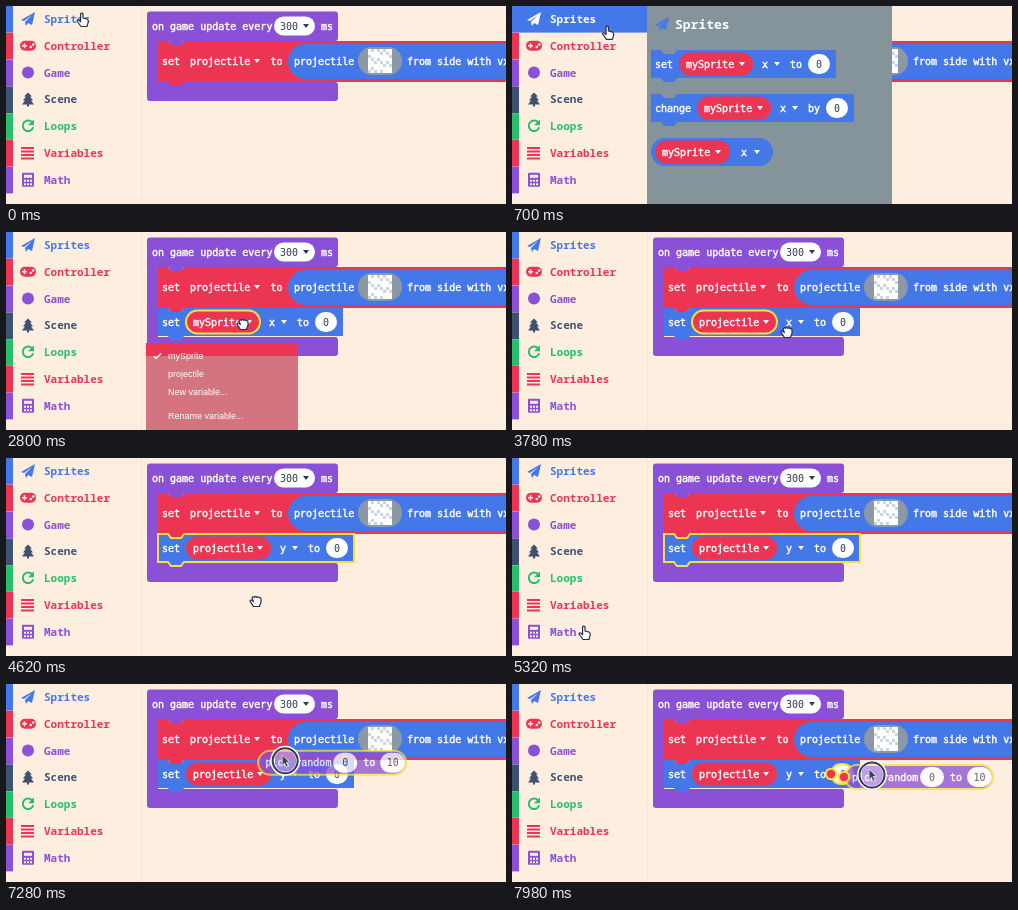
An HTML page that plays this animation: 500 by 198 pixels, repeating every 8 s.

```html
<!DOCTYPE html>
<html lang="en">
<head>
<meta charset="utf-8">
<title>Block editor</title>
<style>
  html, body { margin: 0; width: 100%; height: 100%; overflow: hidden; background: #feeedf; }
  svg { display: block; width: 500px; height: 198px; }
  text { white-space: pre; stroke-width: 0; }
  .code { font: 10px "DejaVu Sans Mono", monospace; stroke-width: .45px; }
  .num { font: 10px "DejaVu Sans Mono", monospace; }
  .side { font: 600 11px "Noto Sans Mono", "DejaVu Sans Mono", monospace; }
  .head { font: 700 13px "Noto Sans Mono", "DejaVu Sans Mono", monospace; }
  .menu { font: 9px "Liberation Sans", Arial, sans-serif; }
</style>
</head>
<body>
<svg viewBox="0 0 500 198" xmlns="http://www.w3.org/2000/svg">
  <defs>
    <pattern id="grid" width="17" height="17" x="142" y="2" patternUnits="userSpaceOnUse">
      <rect width="1.2" height="1.2" fill="#f5e3d3"/>
    </pattern>
  </defs>
  <g id="scene"></g>
</svg>
<script>
const LOOP = 8000, STEP = 140;
const BG = '#feeedf', BLUE = '#4478e8', RED = '#ec3553', PURPLE = '#8a50d6', NAVY = '#3f5170',
  GREEN = '#27bf6c', YELLOW = '#f7e03c', GRAY = '#85939a', INK = '#333c4e';

const text = (x, y, s, fill = '#fff', cls = 'code') =>
  `<text class="${cls}" x="${x}" y="${y}" fill="${fill}" stroke="${fill}">${s}</text>`;
const box = (x, y, w, h, r, fill, extra = '') =>
  `<rect x="${x}" y="${y}" width="${w}" height="${h}" rx="${r}" fill="${fill}" ${extra}/>`;
const path = (d, fill, extra = '') => `<path d="${d}" fill="${fill}" ${extra}/>`;
const caret = (x, y, fill = '#fff') => path(`M${x - 3} ${y - 2}h6l-3 4z`, fill);
const group = (x, y, body, extra = '') => `<g transform="translate(${x} ${y})" ${extra}>${body}</g>`;
const outline = on => on ? `stroke="${YELLOW}" stroke-width="2"` : '';

// Statement block with a notch above and a tab below
const stack = (x, y, w, h, fill, extra = '') => path(
  `M${x} ${y}h10l3 4h10l3 -4H${x + w}v${h}H${x + 26}l-3 4h-10l-3 -4H${x}z`, fill, extra);
const oval = (x, y, w, s) => box(x, y, w, 20, 10, '#fff') +
  text(x + w / 2 - s.length * 3, y + 13.5, s, INK, 'num');

const icons = {
  Sprites: c => path('M-7 1L7 -7L4 6L0 4L-2 7L-3 3L4 -4L-4 2z', c),
  Controller: c => box(-8, -5, 16, 10, 5, c) +
    path('M-6 0h5M-3.5 -2.5v5', 'none', `stroke="${BG}" stroke-width="1.5"`) +
    `<circle cx="2.8" cy="1.2" r="1.3" fill="${BG}"/><circle cx="5.2" cy="-1.2" r="1.3" fill="${BG}"/>`,
  Game: c => `<circle r="6" fill="${c}"/>`,
  Scene: c => path('M0 -7L4 -3H2L5 1H3L6 5H1V7H-1V5H-6L-3 1H-5L-2 -3H-4z', c),
  Loops: c => path('M4 -4A5.3 5.3 0 1 0 5.2 1', 'none', `stroke="${c}" stroke-width="2"`) +
    path('M6 -7V-1H0z', c),
  Variables: c => path('M-7 -5H6M-7 -1.5H6M-7 2H6M-7 5.5H6', 'none', `stroke="${c}" stroke-width="1.8"`),
  Math: (c, hole = BG) => box(-6, -7, 12, 14, 1, c) + box(-4, -5, 8, 3, 0, hole) +
    path('M-4 1h8M-4 4.5h8', 'none', `stroke="${hole}" stroke-width="2" stroke-dasharray="2 1"`)
};
const tints = { Sprites: BLUE, Controller: RED, Game: PURPLE, Scene: NAVY, Loops: GREEN, Variables: RED, Math: PURPLE };

function sidebar(active, faded) {
  const rows = Object.keys(tints).map((name, i) => {
    const on = name === active, c = on ? '#fff' : tints[name], y = 13 + i * 26.8;
    const label = on && faded ? '' :
      group(22, y, icons[name](c, on ? tints[name] : BG)) + text(38, y + 4, name, c, 'side');
    return box(0, y - 13, on ? 135 : 7, 26.6, 0, tints[name]) + label;
  }).join('');
  return box(0, 0, 136, 198, 0, BG) + box(135, 0, 1, 198, 0, '#f5e3d3') +
    `<g opacity="${faded ? 0.68 : 1}">${rows}</g>` + (faded ? trash() : '');
}

const trash = () => '<g opacity=".8">' +
  path('M45 110h14l2 -4h12l2 4h14v5h-44zM48 118h38l-3 41h-32z', '#eebfa4') +
  path('M58 124v28M67 124v28M76 124v28', 'none', `stroke="${BG}" stroke-width="2.5"`) + '</g>';

function picture(x, y) {
  let dots = '';
  for (let i = 0; i < 64; i++)
    if ((i * i * 5 + i * 3) % 11 < 6) dots += box(x + i % 8 * 3, y + Math.floor(i / 8) * 3, 3, 3, 0, '#fff');
  return box(x - 10, y - 2, 44, 28, 14, '#8b98a6') + box(x, y, 24, 24, 1, '#ccd5e2') + dots;
}

const redBlock = y => group(0, y,
  stack(152, 0, 360, 41, RED) + text(156, 23.5, 'set') + text(184, 23.5, 'projectile') + caret(251, 20) +
  text(264.5, 23.5, 'to') + box(282, 3, 240, 35, 17.5, BLUE) + text(288, 23.5, 'projectile') +
  picture(362, 8) + text(401, 23.5, 'from side with vx'));

const container = bottom => path(
  `M144 5.5H329q3 0 3 3V32q0 3 -3 3H178l-3 4h-10l-3 -4H152V${bottom - 19}H329q3 0 3 3V${bottom - 3}q0 3 -3 3H144q-3 0 -3 -3V8.5q0 -3 3 -3z`, PURPLE) +
  text(146, 23.5, 'on game update every') + box(268, 10.5, 41, 19, 9.5, '#fff') +
  text(274, 23.5, '300', INK, 'num') + caret(300, 20, INK) + text(315, 23.5, 'ms');

function setBlock(x, y, { name = 'mySprite', prop = 'x', verb = 'set', join = 'to', picked, field } = {}) {
  const start = 28 + (verb.length - 3) * 6, w = 30 + name.length * 5.5, end = start + w;
  return group(x, y, stack(0, 0, end + 83, 28, BLUE, outline(picked)) + text(4, 17.5, verb) +
    box(start, 2.5, w, 23, 11.5, RED, outline(field)) + text(start + 7, 17.5, name) + caret(end - 11, 14) +
    text(end + 9, 17.5, prop) + caret(end + 24, 14) + text(end + 37, 17.5, join) + oval(end + 55, 4, 22, '0'));
}

const randomBlock = (x, y, picked, alpha = 1) => group(x, y,
  box(1, 0.5, 148, 24, 12, PURPLE, outline(picked)) + text(8, 16, 'pick random') +
  oval(76, 2.5, 24, '0') + text(106, 16, 'to') + oval(123, 2.5, 25, '10'), `opacity="${alpha}"`);

const flyout = (name, w, body) => box(135, 0, w, 198, 0, GRAY) +
  group(150, 18, icons[name](tints[name], '#fff')) + text(163, 22.5, name, '#fff', 'head') + body;

function menu(x, w, fill, accent, items, hover, alpha) {
  const rows = items.map(([s, y], i) =>
    (i === hover ? box(x, y - 13, w, 13, 0, accent) : '') + text(x + 22, y + 3, s, '#fff', 'menu')).join('');
  return box(x, 111, w, 95, 2, fill, `opacity="${alpha}"`) + rows +
    path(`M${x + 8} 124l2 2.5l5 -5`, 'none', 'stroke="#fff" stroke-width="1.4"');
}
const names = [['mySprite', 124], ['projectile', 142], ['New variable...', 160], ['Rename variable...', 184]];
const props = [['x', 124], ['y', 142], ['vx (velocity x)', 160], ['vy (velocity y)', 178]];

// Pointer stops: time, x, y
const route = [[0, 77, 14], [420, 77, 14], [1260, 152, 64], [1540, 152, 64], [1680, 168, 83], [1960, 167, 100],
  [2100, 166, 97], [2240, 170, 97], [2520, 237, 92], [2940, 237, 92], [3220, 190, 143], [3500, 190, 143],
  [3780, 275, 100], [3920, 288, 93], [4200, 288, 93], [4420, 250, 143], [4620, 250, 143], [5180, 73, 175],
  [5740, 73, 175], [6300, 169, 57], [6580, 169, 57], [7840, 358, 91], [7980, 360, 91], [8000, 360, 91]];

function pointerAt(t) {
  const i = route.findIndex(p => p[0] > t), [t0, x0, y0] = route[i - 1], [t1, x1, y1] = route[i];
  const k = (t - t0) / (t1 - t0), e = k * k * (3 - 2 * k);
  return [x0 + (x1 - x0) * e, y0 + (y1 - y0) * e];
}

const POINT = 'M-2.4 -6q1.3 -1.6 2.4 0v4l4.2 1.2q1.6 .8 1 3l-1.2 4.3h-6l-4 -5.5q.2 -1.6 1.8 -.9l1.8 1.6z';
const GRAB = 'M-4 -3q1 -2 2.4 -.6q1 -2 2.4 0q1.4 -1.4 2.4 .4q1.6 -.6 1.8 1v3.5l-1.6 4.2h-6l-3.4 -5.4q.4 -1.8 2 -.6l1.4 1z';
const ARROW = 'M-3 -6L4.5 1.5H1.2L3 5.5L1 6.3L-.8 2.3L-3 4.5z';

function pointer(x, y, pressed, arrow) {
  const ring = pressed ? `<circle r="13" fill="#fff" fill-opacity=".3" stroke="#fff" stroke-width="4"/>
    <circle r="12.5" fill="none" stroke="${INK}" stroke-width="2"/>` : '';
  const shape = arrow ? path(ARROW, '#3d4152', 'stroke="#d8d4e2" stroke-width=".9"') :
    path(x < 130 ? POINT : GRAB, '#fff', 'stroke="#26304a" stroke-width="1.2" stroke-linejoin="round"');
  return group(x, y, ring + shape);
}

function draw(t) {
  const within = (a, b) => t >= a && t < b;
  const [x, y] = pointerAt(t);
  const dragSet = within(1540, 2100), dragRandom = t >= 6580, placed = t >= 2100;
  const above = within(1680, 1960), below = within(1960, 2100);
  const faded = within(1540, 1960) || dragRandom && x < 230;
  const active = within(280, 1960) ? 'Sprites' : t >= 5600 && (!dragRandom || faded) ? 'Math' : '';
  const pressed = [[140, 280], [1400, 2100], [2660, 2800], [3360, 3500], [4060, 4200], [4480, 4620],
    [5460, 5600], [6580, 8000]].some(([a, b]) => within(a, b));

  let out = box(0, 0, 500, 198, 0, BG) + box(136, 0, 364, 198, 0, 'url(#grid)');
  out += container(placed || above || below ? 124 : 95);
  if (above) out += stack(152, 35, 145, 28.5, '#b7b4b7');
  out += redBlock(above ? 64 : 35);
  if (below) out += stack(152, 76, 186, 28, '#b7b4b7');
  if (placed) out += setBlock(152, 76, {
    name: t >= 3500 ? 'projectile' : 'mySprite',
    prop: t >= 4620 ? 'y' : 'x',
    picked: within(2100, 2660) || within(4620, 6580),
    field: within(2660, 4060)
  });
  out += sidebar(active, faded);

  if (within(280, 1540)) out += flyout('Sprites', 245,
    setBlock(139, 44, { picked: t >= 1400 }) +
    setBlock(139, 88, { verb: 'change', join: 'by' }) +
    box(139, 132, 122, 28, 14, BLUE) + box(143, 134.5, 75, 23, 11.5, RED) +
    text(150, 149.5, 'mySprite') + caret(206, 146) + text(229, 149.5, 'x') + caret(245, 146));
  if (within(5600, 6580)) out += flyout('Math', 165, randomBlock(139, 44, t >= 6300));

  if (within(2800, 3500))
    out += menu(140, 152, '#c5465a', RED, names, t < 3080 ? 0 : 1, t < 2940 ? 0.72 : 1);
  if (within(4200, 4620))
    out += menu(219, 130, '#3a66c6', BLUE, props, t < 4340 ? 0 : 1, t < 4340 ? 0.72 : 1);

  if (dragSet) out += setBlock(x - 14, y - 21, { picked: true });
  if (dragRandom) {
    const near = x > 320;
    if (near) out += box(319, 80, 22, 20, 10, 'none', outline(true));
    out += randomBlock(x - 28, y - 10.5, true, 0.76);
    if (near) out += [[319, 90], [x - 28, y + 2]].map(([cx, cy]) =>
      `<circle cx="${cx}" cy="${cy}" r="5.2" fill="${RED}" stroke="${YELLOW}" stroke-width="2"/>`).join('');
  }
  return out + pointer(x, y, pressed, within(1260, 2100) || t >= 6300);
}

const scene = document.getElementById('scene');
let shown = -1;
function tick() {
  const step = Math.floor(performance.now() % LOOP / STEP);
  if (step !== shown) {
    shown = step;
    scene.innerHTML = draw(step * STEP);
  }
  requestAnimationFrame(tick);
}
tick();
</script>
</body>
</html>
```
